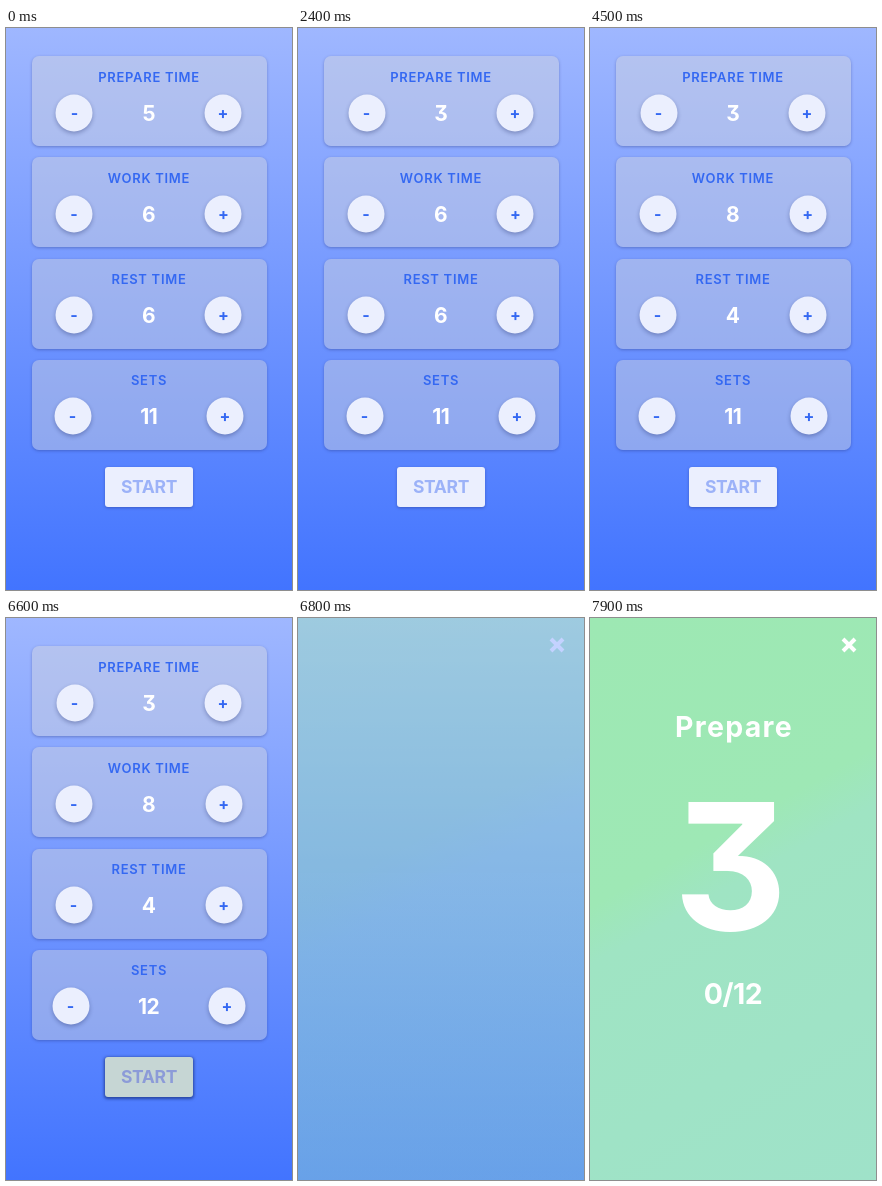
Recreate the animation shown at these times as an HTML page. Size 286 px wide and 562 px high, loop 8000 ms.

```html
<!DOCTYPE html>
<html lang="en">
<head>
<meta charset="utf-8">
<title>Interval timer</title>
<style>
html, body { margin: 0; width: 100%; height: 100%; overflow: hidden; }
body {
  position: relative;
  background: linear-gradient(#9fb7ff, #4274ff);
  font-family: Inter, "Open Sans", sans-serif;
  font-weight: 700;
  font-feature-settings: "cv09";
}
.mid { position: absolute; transform: translate(-50%, -50%); white-space: nowrap; line-height: 1; }
.card {
  position: absolute; left: 25.5px; width: 235px; height: 90px; border-radius: 7px;
  background: rgba(215, 215, 220, .42);
  box-shadow: 0 1px 3px rgba(30, 40, 110, .35);
}
.label { left: 117.5px; top: 20.5px; font-size: 13px; font-weight: 600; letter-spacing: .7px; color: #3468f2; }
.value { left: 117.2px; top: 56.5px; font-size: 21px; letter-spacing: -.5px; color: #fff; }
.btn {
  top: 56.5px; width: 37px; height: 37px; border-radius: 50%;
  font-size: 16px; line-height: 37px; text-align: center; color: #3468f2;
  background: #ebeffe; box-shadow: 0 2px 4px rgba(20, 30, 90, .32);
}
#start {
  left: 143px; top: 459px; width: 88px; height: 40px; border-radius: 3px;
  font-size: 17.5px; line-height: 40px; letter-spacing: -.3px; text-align: center;
  color: #9cb2f8; background: #ebeffe; box-shadow: 0 1px 3px rgba(20, 30, 90, .35);
}
#start.down { color: #8c9bd8; background: #c6d6d4; box-shadow: 0 1px 3px 1px rgba(20, 40, 110, .65); }
#timer {
  position: absolute; inset: 0; color: #fff;
  background: linear-gradient(150.6deg, #9de8b3, #9ee8b5 40%, #9fe4c3 48%, #9fe2c9);
}
#close { position: absolute; left: 251px; top: 18.5px; }
</style>
</head>
<body>
<div id="setup"><div id="start" class="mid">START</div></div>
<div id="timer">
  <svg id="close" width="16" height="16"><path d="M2 2L14 14M14 2L2 14" stroke="#fff" stroke-width="4"/></svg>
  <div id="count">
    <div class="mid" style="left:144px;top:108.5px;font-size:28.5px;letter-spacing:1.3px">Prepare</div>
    <div class="mid" style="left:140.5px;top:248px;font-size:176px">3</div>
    <div class="mid" style="left:143px;top:375.5px;font-size:28.5px;letter-spacing:-.5px">0/12</div>
  </div>
</div>
<script>
const LOOP = 8000, START = 6600, OPEN = 6640;
const $ = id => document.getElementById(id);
const clamp = v => Math.max(0, Math.min(1, v));
// Distance of the buttons from the centre follows the width of the number
const reach = { 3: 74.2, 4: 75.1, 5: 74.3, 6: 74.7, 7: 74.6, 8: 74.9, 11: 76.2, 12: 78.2 };

const rows = [
  { name: 'PREPARE TIME', from: 5, step: -1, taps: [100, 1000] },
  { name: 'WORK TIME', from: 6, step: 1, taps: [2480, 3000] },
  { name: 'REST TIME', from: 6, step: -1, taps: [3400, 4100] },
  { name: 'SETS', from: 11, step: 1, taps: [5500] },
];

function add(parent, kind, text) {
  const el = document.createElement('div');
  el.className = kind;
  el.textContent = text;
  return parent.appendChild(el);
}

rows.forEach((row, i) => {
  const card = add($('setup'), 'card', '');
  card.style.top = 28.3 + i * 101.1 + 'px';
  add(card, 'mid label', row.name);
  row.minus = add(card, 'mid btn', '-');
  row.value = add(card, 'mid value', '');
  row.plus = add(card, 'mid btn', '+');
});

// Dims quickly while held, then fades back
const press = dt => dt < 0 ? 0 : Math.min(clamp(dt / 80), clamp((400 - dt) / 250));

function draw(t) {
  for (const row of rows) {
    const n = row.from + row.step * row.taps.filter(tap => t >= tap + 120).length;
    const dim = Math.max(...row.taps.map(tap => press(t - tap)));
    row.value.textContent = n;
    row.minus.style.left = 117.2 - reach[n] + 'px';
    row.plus.style.left = 117.2 + reach[n] + 'px';
    (row.step < 0 ? row.minus : row.plus).style.opacity = 1 - .5 * dim;
  }
  $('start').classList.toggle('down', t >= START);
  $('setup').style.display = t < START + 80 ? '' : 'none';
  $('timer').style.opacity = t < START + 80 ? 0 : 1 - (1 - clamp((t - OPEN) / 700)) ** 2;
  $('count').style.opacity = clamp((t - 7400) / 400);
}

function tick() {
  draw(performance.now() % LOOP);
  requestAnimationFrame(tick);
}
tick();
</script>
</body>
</html>
```
